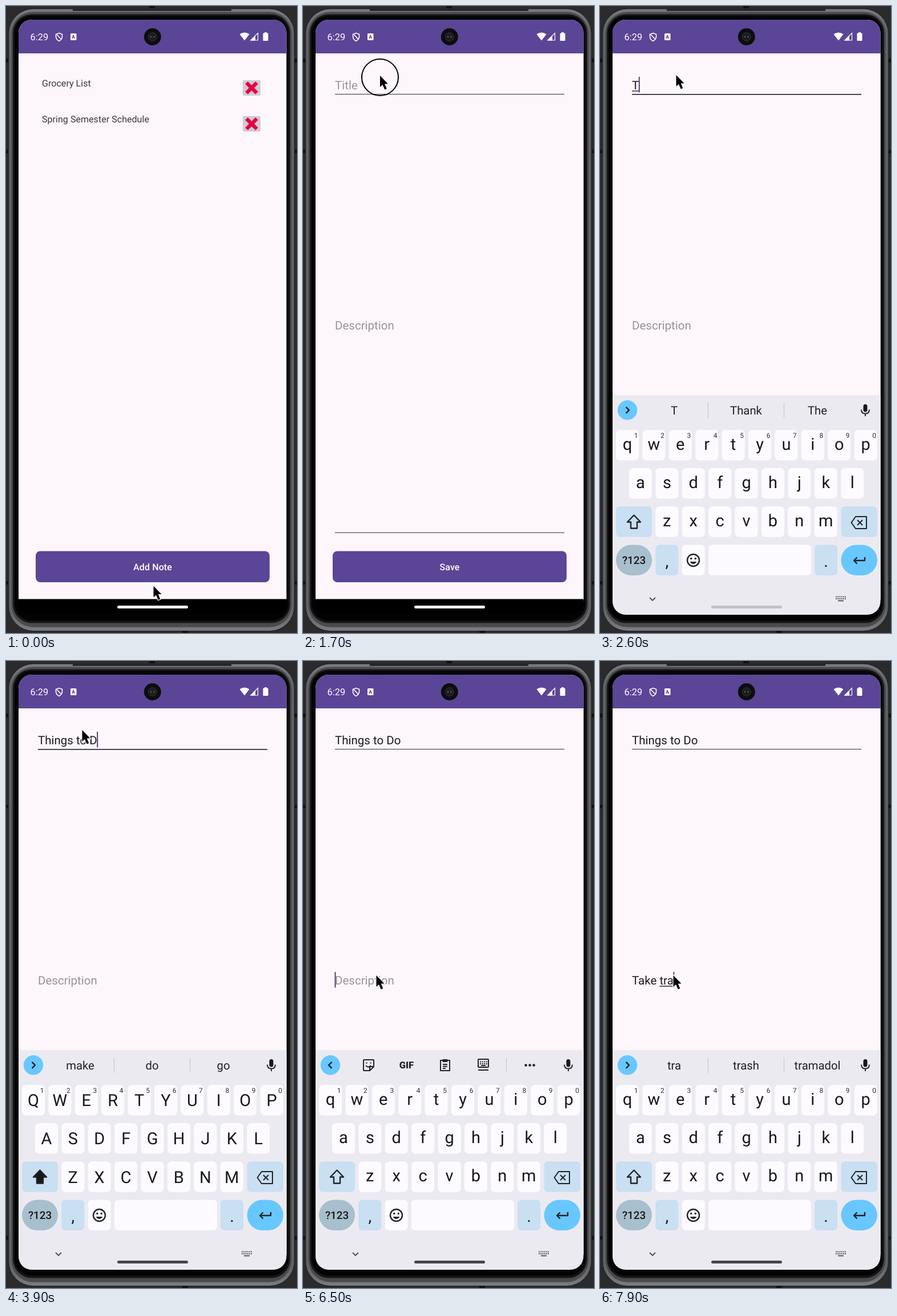
An HTML page that plays this animation: 510 px wide and 1099 px high, repeating every 8000 ms.

```html
<!DOCTYPE html>
<html lang="en">
<head>
<meta charset="utf-8">
<title>Notes app</title>
<style>
  html, body { margin: 0; width: 100%; height: 100%; overflow: hidden; background: #2b2b2d; }
  svg { display: block; width: 100vw; height: 100vh; font-family: Roboto, sans-serif; }
  text { white-space: pre; text-rendering: geometricPrecision; }
  .item { font-size: 16.1px; fill: #3b383e; }
  .button { font-size: 16px; font-weight: 500; letter-spacing: .11px; fill: #fff; text-anchor: middle; }
  .field { font-size: 20.5px; fill: #1d1b20; }
  .field.hint { fill: #98949b; }
  .key { font-size: 29px; fill: #17171a; text-anchor: middle; }
  .digit { font-size: 12px; fill: #2b2b30; text-anchor: middle; }
  .word { font-size: 20.3px; fill: #202024; text-anchor: middle; }
  .icon { fill: none; stroke: #202327; stroke-width: 2; stroke-linejoin: round; }
  .icon.bold { stroke-width: 2.4; }
  .dots { fill: none; stroke: #202327; stroke-linecap: round; }
</style>
</head>
<body>
<svg viewBox="0 0 510 1099" preserveAspectRatio="none">
  <defs>
    <clipPath id="screenShape"><rect x="22" y="24" width="469.5" height="1043" rx="23"/></clipPath>
    <linearGradient id="metal" x2="0" y2="1">
      <stop offset="0" stop-color="#7c7c7e"/><stop offset=".04" stop-color="#5c5c5e"/>
      <stop offset=".96" stop-color="#5c5c5e"/><stop offset="1" stop-color="#7c7c7e"/>
    </linearGradient>
    <g id="delete">
      <rect x="-15.5" y="-13.5" width="31" height="27" rx="2" fill="#cfcbd0"/>
      <path d="M-9-9 9 9M9-9-9 9" stroke="#e40046" stroke-width="6.6"/>
    </g>
    <g id="keyboardIcon" fill="none" stroke="#202327" stroke-width="2">
      <rect x="-9" y="-10" width="18" height="14" rx="1"/>
      <path d="M-6-5.5H7M-6-2H7" stroke-dasharray="2 1.6"/>
      <path d="M-4 1H4M-9 9H9"/>
    </g>
  </defs>

  <rect width="510" height="1099" fill="#2b2b2d"/>
  <path d="M2 92v7M2 252v6M2 1008v6M508 92v7M508 252v6M508 1008v6" stroke="#111" stroke-width="4"/>
  <rect x="4" y="4" width="502" height="1092" rx="44" fill="#222224"/>
  <rect x="5" y="5.500" width="500" height="1089.500" rx="43" fill="url(#metal)"/>
  <rect x="8.500" y="10" width="493" height="1079" rx="39" fill="#4a4a4c" stroke="#707072"/>
  <rect x="12" y="14.500" width="486" height="1067" rx="33" fill="#151517"/>
  <rect x="15" y="17.500" width="480" height="1060" rx="30" fill="#030304"/>
  <path d="M117 7H395" stroke="#1c1c1e" stroke-width="3"/>
  <path d="M251 2h10M309 1097h10" stroke="#111" stroke-width="4"/>

  <g clip-path="url(#screenShape)">
    <rect x="22" y="24" width="470" height="1018" fill="#fdf7fc"/>
    <g id="list">
      <text class="item" x="63" y="141">Grocery List</text>
      <text class="item" x="63" y="203.500">Spring Semester Schedule</text>
      <use href="#delete" x="430.500" y="143.500"/>
      <use href="#delete" x="430.500" y="206.500"/>
      <rect x="52" y="955.500" width="410" height="54.500" rx="8" fill="#5b4596"/>
      <text class="button" x="257" y="989">Add Note</text>
    </g>
    <g id="editor">
      <rect x="22" y="83" width="470" height="959" fill="#fdf7fc"/>
      <text id="title" x="56" y="146"></text>
      <rect id="titleLine" x="56" y="154" width="402" fill="#4c4852"/>
      <text id="description" x="56" y="567"></text>
      <rect x="56" y="922.500" width="402" height="1.200" fill="#4c4852"/>
      <rect x="52" y="955.500" width="410" height="54.500" rx="8" fill="#5b4596"/>
      <text class="button" x="257" y="989">Save</text>
      <rect id="composing" height="1.400" fill="#1d1b20"/>
      <rect id="caret" width="1.800" height="27.500" fill="#3e3560"/>
    </g>
    <rect x="22" y="1039.500" width="470" height="29"/>

    <rect x="22" y="24" width="470" height="59" fill="#5b4596"/>
    <g fill="#fff">
      <text x="42.500" y="60" font-size="16.400">6:29</text>
      <path d="M93 47.500 98.500 49.500V54Q98 59 93 61.500 88 59 87.500 54V49.500ZM89 50 97 58.500" fill="none" stroke="#fff" stroke-width="1.600"/>
      <rect x="113" y="48" width="10.500" height="12" rx="1.500"/>
      <text x="118.200" y="57" font-size="8.500" font-weight="900" text-anchor="middle" fill="#5b4596">A</text>
      <path d="M409.500 49.500Q418 43.500 426.500 49.500L418 60.500Z"/>
      <path d="M429 60 441.500 47.500V60Z" fill="none" stroke="#fff" stroke-width="1.200"/>
      <path d="M428 60.500 437 51.500V60.500Z"/>
      <path d="M450.500 48.500Q450.500 47.500 452 47.500H453V46H457V47.500H458Q459.500 47.500 459.500 48.500V60Q459.500 61 458.500 61H451.500Q450.500 61 450.500 60Z"/>
    </g>
    <circle cx="256.800" cy="54" r="15" fill="#0d0d0f"/>
    <circle cx="256.800" cy="54" r="7.500" fill="#1d1d20" stroke="#303034"/>
    <path d="M253 54h2M258.500 54h2" stroke="#66666c" stroke-width="2"/>

    <g id="keyboard">
      <rect x="22" y="682" width="470" height="387" fill="#eceaf1"/>
      <circle cx="48" cy="708.300" r="17.200" fill="#68c7ff"/>
      <path id="chevron" class="icon bold"/>
      <g id="words">
        <path d="M189.500 695v27M322.500 695v27" stroke="#c4c3ca"/>
        <text class="word" x="130" y="716"></text>
        <text class="word" x="256" y="716"></text>
        <text class="word" x="381" y="716"></text>
      </g>
      <g id="tools">
        <g class="icon">
          <path d="M107 699H123Q124 699 124 700V711L117 718H107Q106 718 106 717V700Q106 699 107 699ZM124 711H117V718M110 709Q114 714 119 709M110.500 704.500h2M117.500 704.500h2"/>
          <path d="M241 700H257V718H241ZM245 707H253M245 710.500H253M245 714H250M245.500 699H252.500V702H245.500Z"/>
        </g>
        <text x="181.500" y="714" font-size="16.500" font-weight="900" text-anchor="middle" fill="#202327">GIF</text>
        <use href="#keyboardIcon" x="316" y="708"/>
        <path d="M356.500 696v25" stroke="#c4c3ca"/>
        <path class="dots" d="M390.500 708.500h.1M397.500 708.500h.1M404.500 708.500h.1" stroke-width="4.600"/>
      </g>
      <rect x="461.500" y="698" width="7" height="13.500" rx="3.500" fill="#17171a"/>
      <path class="icon" d="M458 707.500Q458 714.500 465 714.500T472 707.500M465 714.500V719"/>
      <g id="keys"></g>
      <path id="shift" class="icon bold" d="M59.500 892.500 71 904.500H65V915.500H54V904.500H48Z"/>
      <path class="icon" d="M448 895H467V916H448L440.500 905.500ZM451 901 460 910M460 901 451 910"/>
      <text x="59.500" y="978" font-size="18.800" font-weight="500" text-anchor="middle" fill="#17171a">?123</text>
      <circle class="icon bold" cx="163.500" cy="971.500" r="10.500"/>
      <path class="dots" d="M159.700 968.500h.1M167.200 968.500h.1" stroke-width="3.400"/>
      <path d="M157.800 974H169.200Q167.500 978 163.500 978T157.800 974" fill="#202327"/>
      <path class="icon bold" d="M464 966V972H445M450.500 966.500 445 972 450.500 977.500"/>
      <path d="M87 1037 92 1042 97 1037" fill="none" stroke="#4a484e" stroke-width="1.800"/>
      <path d="M413 1035.500h18M413 1039h18" stroke="#5b595f" stroke-width="2" stroke-dasharray="2 1.200"/>
      <path d="M417 1042.500h10" stroke="#5b595f" stroke-width="2"/>
    </g>
    <rect id="handle" x="195" y="1051" width="124" height="5" rx="2.500"/>
  </g>
  <g id="pointer">
    <circle id="press" cy="3" r="32" fill="none" stroke="#000" stroke-width="2"/>
    <path d="M0 0V20L4.500 16 8.200 24.500 11.800 23 8.200 14.500H14Z" stroke="#fff" stroke-width="2.400" paint-order="stroke"/>
  </g>
</svg>
<script>
const $ = id => document.getElementById(id);
const LOOP = 8000, STEP = 100;
const measure = document.createElement('canvas').getContext('2d');
const textWidth = s => {
  measure.font = '20.5px Roboto, sans-serif';
  measure.textRendering = 'geometricPrecision';
  return measure.measureText(s).width;
};
const clamp = v => Math.max(0, Math.min(1, v));
const between = (t, a, b) => t >= a && t < b;
const easeOut = p => 1 - (1 - p) ** 3;
const easeInOut = p => p * p * (3 - 2 * p);

function add(tag, attrs, content = '') {
  const el = document.createElementNS('http://www.w3.org/2000/svg', tag);
  for (const name in attrs) el.setAttribute(name, attrs[name]);
  el.textContent = content;
  return $('keys').appendChild(el);
}

const WHITE = '#fdfbff', PALE = '#c9dff2';
const addKey = (x, y, width, fill, rx = 7) => add('rect', { x, y, width, height: 53.5, rx, fill });
const letters = [];
['qwertyuiop', 'asdfghjkl', 'zxcvbnm'].forEach((row, r) => {
  const y = 743 + r * 67.1, left = [48, 71, 117.3][r];
  [...row].forEach((char, i) => {
    const x = left + i * 46.4;
    addKey(x - 20, y, 40, WHITE);
    letters.push({ char, y, el: add('text', { class: 'key', x }) });
    if (!r) add('text', { class: 'digit', x: x + 15, y: 757 }, (i + 1) % 10);
  });
});
addKey(28, 877.2, 63, PALE);
addKey(422.5, 877.2, 63.5, PALE);
addKey(28, 944.5, 63, '#a8bfcd', 26.7);
addKey(97.3, 944.5, 40, PALE);
addKey(143.7, 944.5, 40, WHITE);
addKey(190, 944.5, 180, WHITE);
addKey(376, 944.5, 40, PALE);
addKey(422.5, 944.5, 63.5, '#68c7ff', 26.7);
add('text', { class: 'key', x: 117.3, y: 983 }, ',');
add('text', { class: 'key', x: 396, y: 983 }, '.');

// Each entry is the time at which that many characters are in the field.
const titleText = 'Things to Do';
const titleTimes = [2500, 2800, 2900, 3000, 3100, 3200, 3300, 3400, 3500, 3600, 3900, 4100];
const noteText = 'Take tra';
const noteTimes = [6700, 6800, 7000, 7100, 7300, 7500, 7600, 7800];
const typed = (text, times, t) => text.slice(0, times.filter(at => at <= t).length);

const suggestions = {
  'T': 'T Thank The', 'Th': 'Th The That', 'Thi': 'Thi This Think', 'Thin': 'Thin Think Thing',
  'Thing': 'Thing Things Think', 'Things': 'Things Thing Think', 'Things ': 'to are have',
  'Things t': 't to the', 'Things to': 'to too today', 'Things to ': 'make do go',
  'Things to D': 'D Do Did', 'Things to Do': "Do So Don't",
  'Ta': 'Ta Take Talk', 'Tak': 'Tak Take Taking', 'Take': 'Take Taken Takes',
  'Take ': 'care it the', 'Take t': 't the to', 'Take tr': 'tr try true', 'Take tra': 'tra trash tramadol'
};

const TITLE_FOCUS = 1800, NOTE_FOCUS = 5500;
const path = [
  [0, 258.5, 1016.5], [500, 256, 985], [900, 256, 985], [1500, 135, 122], [1900, 135, 122],
  [2100, 133.5, 121], [4300, 133.5, 121], [4800, 140, 564], [5100, 140, 564],
  [5400, 128.5, 551], [LOOP, 128.5, 551]
];

function pointerAt(t) {
  const i = path.findIndex(p => p[0] > t);
  const [t0, x0, y0] = path[i - 1], [t1, x1, y1] = path[i];
  const p = easeInOut((t - t0) / (t1 - t0));
  return [x0 + (x1 - x0) * p, y0 + (y1 - y0) * p];
}

const show = (el, on) => { el.style.display = on ? '' : 'none'; };

function setField(el, text, hint) {
  el.textContent = text || hint;
  el.setAttribute('class', text ? 'field' : 'field hint');
}

function render(t) {
  const open = easeOut(clamp((t - 800) / 400));
  $('editor').style.opacity = open;
  $('editor').setAttribute('transform', `translate(${47 * (1 - open)} 0)`);

  const title = typed(titleText, titleTimes, t), note = typed(noteText, noteTimes, t);
  setField($('title'), title, 'Title');
  setField($('description'), note, 'Description');

  const onNote = t >= NOTE_FOCUS, focused = t >= TITLE_FOCUS;
  $('titleLine').setAttribute('height', focused && !onNote ? 2 : 1.2);
  const text = onNote ? note : title;
  const times = onNote ? noteTimes : titleTimes;
  const baseline = onNote ? 567 : 146;
  const lastChange = Math.max(onNote ? NOTE_FOCUS : TITLE_FOCUS, ...times.filter(at => at <= t));
  show($('caret'), focused && Math.floor((t - lastChange) / 500) % 2 === 0);
  $('caret').setAttribute('x', 55.6 + textWidth(text));
  $('caret').setAttribute('y', baseline - 22);

  // The keyboard reacts one step after the character appears.
  const known = onNote ? typed(noteText, noteTimes, t - STEP) : typed(titleText, titleTimes, t - STEP);
  const start = text.lastIndexOf(' ') + 1;
  const from = textWidth(text.slice(0, start));
  show($('composing'), text.length > start && known.length > start);
  $('composing').setAttribute('x', 56 + from);
  $('composing').setAttribute('y', baseline + 2.3);
  $('composing').setAttribute('width', textWidth(text) - from);

  const words = suggestions[known];
  show($('words'), words);
  show($('tools'), !words);
  $('chevron').setAttribute('d', words ? 'M45.500 702.800 51 708.300 45.500 713.800' : 'M50.500 702.800 45 708.300 50.500 713.800');
  if (words) {
    const list = words.split(' ');
    $('words').querySelectorAll('text').forEach((el, i) => { el.textContent = list[i]; });
  }

  const upper = between(t, 3700, 4000);
  for (const { el, char, y } of letters) {
    el.textContent = upper ? char.toUpperCase() : char;
    el.setAttribute('y', y + (upper ? 37.3 : 35));
  }
  $('shift').style.fill = upper ? '#17171a' : 'none';

  const rise = easeOut(clamp((t - 1900) / 400));
  $('keyboard').setAttribute('transform', `translate(0 ${388 * (1 - rise)})`);
  show($('keyboard'), rise > 0);
  $('handle').setAttribute('fill', t < 2000 ? '#f6f6f6' : t < 2800 ? '#c3c1c7' : '#48464c');

  $('pointer').setAttribute('transform', `translate(${pointerAt(t)})`);
  show($('press'), between(t, 600, 800) || between(t, 1600, 1800) || between(t, 5400, 5600));
}

function tick() {
  render(Math.floor(performance.now() % LOOP / STEP) * STEP);
  requestAnimationFrame(tick);
}
tick();
</script>
</body>
</html>
```
